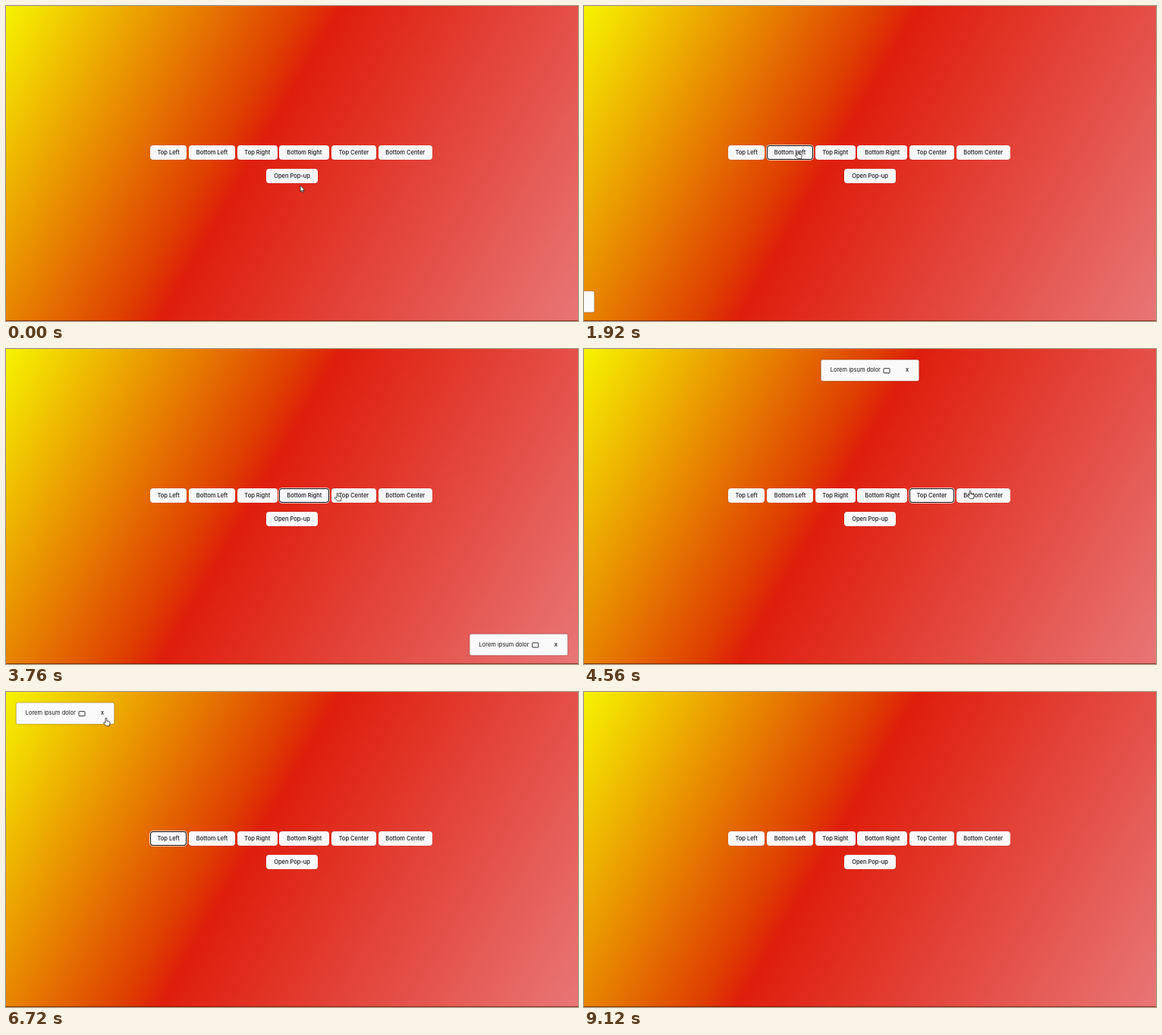
Write an HTML page that moves like this. It is 754x416 px and loops after 9200 ms.

```html
<!DOCTYPE html>
<html lang="en">
<head>
<meta charset="utf-8">
<title>Toast positions</title>
<style>
  html, body { margin: 0; width: 100%; height: 100%; overflow: hidden; }
  #stage {
    position: relative; width: 754px; height: 416px; overflow: hidden;
    background: linear-gradient(120deg, #f6f400 0%, #df4000 39%, #df1e0c 44.5%, #e87676 100%);
    font: 500 7.5px/19.5px Inter, sans-serif; color: #16161c;
  }
  #stage::after {
    content: ""; position: absolute; left: 0; right: 0; bottom: 0; height: 1px;
    background: rgba(80, 20, 0, .6);
  }
  .button {
    position: absolute; height: 19.5px; border-radius: 4px; background: #f9f9fb;
    text-align: center; white-space: nowrap; box-shadow: 0 0 1px rgba(90, 20, 10, .5);
  }
  .button.focus { box-shadow: inset 0 0 0 1px #111, 0 0 0 .8px #fff; }
  #toast {
    position: absolute; left: 0; top: 0; width: 129px; height: 27.5px;
    border-radius: 2px; background: #fafafa; font-weight: 400; line-height: 27.5px;
    white-space: nowrap; box-shadow: 0 0 1.5px rgba(50, 20, 20, .75);
  }
  #toast span { position: absolute; left: 12.2px; }
  #toast b { position: absolute; left: 111.4px; font-weight: 500; }
  #toast i {
    position: absolute; left: 81.5px; top: 10.5px; width: 7.5px; height: 5.5px;
    border: 1px solid #333; border-radius: 1px;
  }
  svg { position: absolute; left: 0; top: 0; overflow: visible; }
  path { fill: #fff; stroke: #222; stroke-width: .8; stroke-linejoin: round; }
</style>
</head>
<body>
<div id="stage">
  <div id="toast"><span>Lorem ipsum dolor</span><i></i><b>x</b></div>
  <svg id="cursor" width="12" height="14">
    <path id="arrow" d="M0 0V8.2L1.8 6.6 3 9.2 4.3 8.6 3.2 6.1H5.6Z"/>
    <path id="hand" d="M-.9 6.5V1.2a.9.9 0 0 1 1.8 0V4.4l3 .6q1.4.3 1.2 1.8L4.4 10.8H.2L-3.2 7.2q-.6-1.2.7-1.3Z"/>
  </svg>
</div>
<script>
const LOOP = 9200, STEP = 80, SLIDE = 320, FOCUS_LEAD = 80, CLOSE_AT = 6960;
const TOAST_W = 129, TOAST_H = 27.5;
const LEFT = 13.5, CENTER = 312.5, RIGHT = 611.3, TOP = 14.2, BOTTOM = 376.5;

// label, x, y, width, then toast x, y and the side it slides in from
const buttons = [
  ['Top Left', 189.8, 183.6, 48.6, LEFT, TOP, -1, 0],
  ['Bottom Left', 241, 183.6, 61, LEFT, BOTTOM, -1, 0],
  ['Top Right', 305, 183.6, 52.6, RIGHT, TOP, 1, 0],
  ['Bottom Right', 360.4, 183.6, 65.8, RIGHT, BOTTOM, 1, 0],
  ['Top Center', 428.9, 183.6, 59, CENTER, TOP, 0, -1],
  ['Bottom Center', 490.8, 183.6, 71, CENTER, BOTTOM, 0, 1],
  ['Open Pop-up', 343.4, 214.8, 67.4]
].map(([label, x, y, w, tx, ty, dx, dy]) => ({ label, x, y, w, tx, ty, dx, dy }));

// time, button index
const clicks = [[880, 0], [1920, 1], [2480, 2], [3200, 3], [4080, 4], [4880, 5], [5840, 0]];

// time, x, y of the pointer tip
const path = [
  [0, 388, 237], [160, 386, 236], [720, 222, 193], [1120, 221, 193], [1680, 278, 191],
  [1920, 282, 191], [2080, 284, 191], [2400, 328, 190], [2560, 331, 190], [2960, 367, 188],
  [3120, 388, 190], [3440, 394, 190], [3920, 452, 190], [4160, 458, 190], [4560, 509, 187],
  [4720, 518, 190], [4960, 517, 190], [5280, 344, 206], [5680, 218, 193], [5920, 216, 193],
  [6560, 134, 38], [6720, 132, 34], [7040, 129, 32], [7760, 131, 36], [8720, 372, 188],
  [9040, 392, 418], [9200, 392, 430]
];

const $ = id => document.getElementById(id);
const stage = $('stage'), toast = $('toast'), cursor = $('cursor');
const move = (el, x, y) => { el.style.transform = `translate(${x}px, ${y}px)`; };
const show = (el, on) => { el.style.display = on ? '' : 'none'; };
const inside = (px, py, x, y, w, h) => px >= x && px <= x + w && py >= y && py <= y + h;

for (const b of buttons) {
  b.el = document.createElement('div');
  b.el.className = 'button';
  b.el.textContent = b.label;
  Object.assign(b.el.style, { left: b.x + 'px', top: b.y + 'px', width: b.w + 'px' });
  stage.insertBefore(b.el, toast);
}

function pointerAt(t) {
  const i = path.findIndex(key => key[0] > t);
  const [t0, x0, y0] = path[i - 1], [t1, x1, y1] = path[i];
  const p = (t - t0) / (t1 - t0), e = p * p * (3 - 2 * p);
  return [x0 + (x1 - x0) * e, y0 + (y1 - y0) * e];
}

function render(t) {
  const open = t < CLOSE_AT;
  const focused = open && clicks.findLast(c => c[0] - FOCUS_LEAD <= t);
  buttons.forEach((b, i) => b.el.classList.toggle('focus', !!focused && focused[1] === i));

  const click = open && clicks.findLast(c => c[0] <= t);
  const source = click && buttons[click[1]];
  show(toast, source);
  if (source) {
    const rest = (1 - Math.min(1, (t - click[0]) / SLIDE)) ** 2;
    move(toast, source.tx + source.dx * TOAST_W * rest, source.ty + source.dy * TOAST_H * rest);
  }

  const [x, y] = pointerAt(t);
  const overClose = source && inside(x, y, source.tx + 102, source.ty + 4, 24, 21);
  const over = overClose || buttons.some(b => inside(x, y, b.x, b.y, b.w, 19.5));
  move(cursor, x, y);
  show($('hand'), over);
  show($('arrow'), !over);
}

const start = performance.now();
function tick() {
  const t = (performance.now() - start) % LOOP;
  render(Math.floor(t / STEP) * STEP);
  requestAnimationFrame(tick);
}
tick();
</script>
</body>
</html>
```
